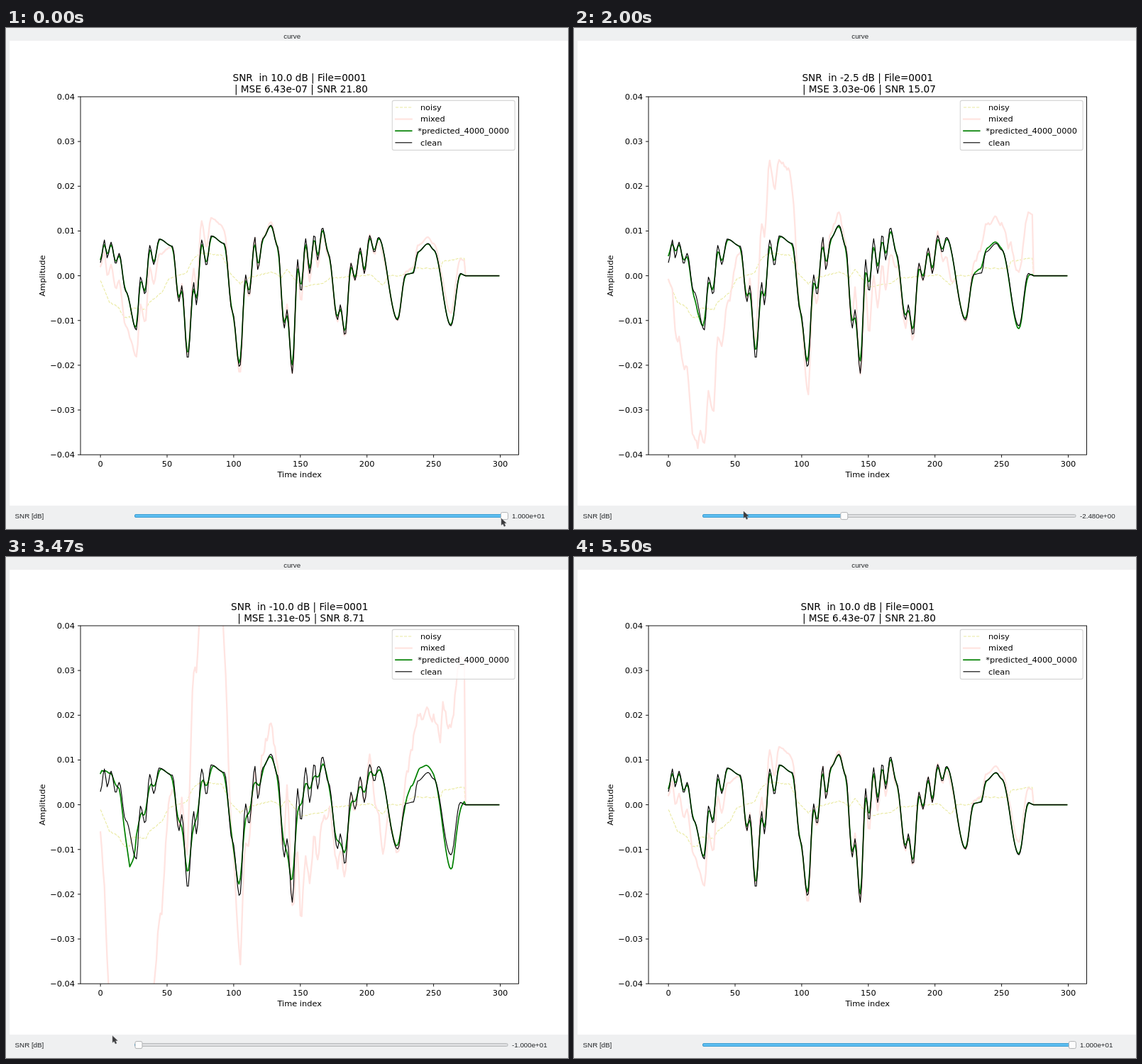
An HTML page that plays this animation: 792x707 px, repeating every 5730 ms.

```html
<!DOCTYPE html>
<html lang="en">
<head>
<meta charset="utf-8">
<title>curve</title>
<style>
html, body { margin: 0; width: 100%; height: 100%; overflow: hidden; background: #eff0f1; }
svg { display: block; }
text { white-space: pre; }
.plot text { font: 11.35px "DejaVu Sans", sans-serif; }
.plot .title { font-size: 13.62px; }
.ui text { font: 9.75px "Liberation Sans", Arial, sans-serif; fill: #232629; }
.mid { text-anchor: middle; }
.end { text-anchor: end; }
.axis { fill: none; stroke: #000; stroke-width: .91; }
.line { fill: none; stroke-linejoin: round; }
.noisy { stroke: #eaeaa2; stroke-width: 1.1; stroke-dasharray: 4.2 1.8; }
.mixed { stroke: #ffe4e1; stroke-width: 2.3; stroke-linecap: square; }
.pred { stroke: #008000; stroke-width: 1.7; stroke-linecap: square; }
.clean { stroke: #000; stroke-width: 1.13; stroke-linecap: square; }
</style>
</head>
<body>
<svg width="792" height="707" viewBox="0 0 792 707">
  <clipPath id="area"><rect x="105" y="97" width="617.5" height="505.2"/></clipPath>
  <rect x="5" y="18" width="787" height="656" fill="#fff"/>
  <g class="plot">
    <g clip-path="url(#area)">
      <path id="noisy" class="line noisy"/>
      <path id="mixed" class="line mixed"/>
      <path id="pred" class="line pred"/>
      <path id="clean" class="line clean"/>
    </g>
    <rect class="axis" x="105" y="97" width="617.5" height="505.2"/>
    <g id="ticks"></g>
    <text class="mid" x="413.7" y="634">Time index</text>
    <text class="mid" transform="translate(55 349.6) rotate(-90)">Amplitude</text>
    <text id="title" class="title mid" x="413.7" y="75"></text>
    <text id="score" class="title mid" x="413.7" y="91"></text>
    <rect x="544.3" y="102.4" width="172.8" height="70" rx="2.3" fill="#fff" fill-opacity=".8" stroke="#ccc" stroke-opacity=".8" stroke-width="1.13"/>
    <g id="legend"></g>
  </g>
  <g class="ui">
    <text class="mid" x="403.2" y="15.4">curve</text>
    <text x="12.6" y="691.8">SNR [dB]</text>
    <rect x="181.5" y="686.5" width="525.5" height="4" rx="1.5" fill="#dddee0" stroke="#b6b8ba"/>
    <rect id="fill" x="181.5" y="686.5" height="4" rx="1.5" fill="#5cbdf0" stroke="#3f9fd3"/>
    <rect id="knob" y="683.6" width="10" height="10" rx="2" fill="#fcfcfc" stroke="#b0b2b4"/>
    <text id="value" x="713" y="691.8"></text>
  </g>
  <path id="cursor" d="M0 0V9.6L2.3 7.8L4 11.4L5.9 10.5L4.3 7.1L7.2 6.8Z" fill="#3a3a3c" stroke="#77787a" stroke-width=".5"/>
</svg>
<script>
const $ = id => document.getElementById(id);
const LOOP = 5730, LAST = 274;

// Interpolates through a flat list x0, y0, x1, y1, ...
const straight = u => u, smooth = u => (1 - Math.cos(Math.PI * u)) / 2;
function along(keys, x, ease = straight) {
  let i = 2;
  while (i < keys.length - 2 && keys[i] < x) i += 2;
  const [x0, y0, x1, y1] = keys.slice(i - 2, i + 2);
  return y0 + (y1 - y0) * ease((x - x0) / (x1 - x0));
}

// Crests and troughs of the signals, amplitudes in units of 1e-4
const cleanKeys = [0, 30, 3, 80, 5, 40, 8, 75, 11.5, 26, 14, 50, 19, -35, 27, -121, 30, -3,
  33.5, -42, 37, 68, 40, 25, 44, 82, 54, 66, 59, -58, 61, -22, 65.5, -187, 70, -15, 72, -65,
  76, 80, 79.5, 22, 83, 89, 93, 72, 99, -80, 104.5, -205, 109, 2, 111.5, -44, 116, 86, 118, 14,
  122, 84, 128, 113, 133, 65, 138, -117, 140, -76, 144, -218, 148, 36, 150.5, -38, 154, 83,
  157, 5, 160.5, 93, 163, 35, 166.5, 108, 171, 50, 178, -98, 180, -65, 183.5, -134, 188, 28,
  191, -10, 195, 62, 198, 5, 202, 90, 205.5, 52, 208.5, 86, 223, -99, 229, 3, 235, 6, 238, 53,
  246, 72, 250, 58, 263, -112, 270, 5, 274, 0];
const noiseKeys = [0, -11, 7, -60, 13, -69, 18, -93, 22, -93, 24, -71, 34, -76, 37, -58, 46, -38,
  51, -8, 65, 8, 69, 36, 75, 50, 91, 46, 97, 7, 105, -18, 112, -4, 128, 9, 136, -3, 140, 14,
  150, -26, 167, -16, 172, -6, 203, 2, 212, -21, 216, 0, 226, 0, 235, 17, 255, 16, 257, 32, 273, 40];
// Where the prediction fails as the noise grows
const leakKeys = [0, 22, 14, 0, 22, -72, 27, 25, 32, 0, 228, 0, 233, 35, 250, 10, 264, -42, 272, 0];

const index = [...Array(300).keys()];
const sample = f => index.map(i => i < LAST ? f(i) : 0);
const clean = sample(i => along(cleanKeys, i, smooth));
const noise = sample(i => along(noiseKeys, i) + 1.2 * Math.sin(i * i));
const leak = sample(i => along(leakKeys, i));

function blur(radius) {
  return sample(i => {
    const near = clean.slice(Math.max(0, i - radius), i + radius + 1);
    return near.reduce((a, b) => a + b) / near.length;
  });
}
const sharp = blur(1), soft = blur(2);

const px = i => 133.1 + i * 1.878;
const py = a => 349.6 - a * .6315;
const trace = (id, f) => $(id).setAttribute('d',
  'M' + index.map(i => px(i).toFixed(1) + ' ' + py(f(i)).toFixed(1)).join('L'));

// Bursts of updates: first tick, last tick, count, at 30 ticks per second
const bursts = [[0, 0, 1], [8, 12, 5], [20, 28, 9], [44, 52, 3], [56, 67, 4], [71, 80, 4],
  [82, 82, 1], [102, 106, 3], [112, 118, 2], [125, 132, 2], [137, 137, 1], [152, 165, 5]];
const steps = bursts.flatMap(([first, last, n]) => Array.from({ length: n }, (_, i) =>
  Math.round((first + Math.round(i * (last - first) / Math.max(1, n - 1))) * 10 / 3) * 10));

const snrKeys = [0, 10, 800, 10, 830, 9.96, 930, 9.96, 1470, 4.62, 2000, -2.48, 2570, -9.78,
  2670, -10, 3530, -10, 3730, -9.12, 3930, -5.32, 4170, -1.06, 4400, 7.34, 4570, 10, LOOP, 10];
const cursorX = [0, 698, 330, 702, 670, 694, 930, 560, 1470, 457, 2000, 239, 2570, 146,
  2730, 122, 3400, 128, 3530, 169, 3730, 260, 3930, 428, 4170, 640, 4400, 850, 5069, 850,
  5070, 212, 5500, -20, LOOP, -20];
const cursorY = [0, 692, 930, 688, 1470, 688, 2000, 682, 2570, 670, 3530, 676, 3930, 682,
  5069, 682, 5070, 157, 5500, -45, LOOP, -45];
const scoreKeys = [-10, 8.71, -9.78, 8.91, -5.32, 12.9, -2.48, 15.07, 4.62, 19.83,
  7.34, 21.017, 10, 21.8];

const sci = (v, digits) => v.toExponential(digits).replace(/([+-])(\d)$/, (m, sign, d) => sign + '0' + d);
const gain = snr => .83 * 10 ** ((10 - snr) / 20);

function setSnr(snr) {
  const k = gain(snr);
  const w = Math.max(0, (k - gain(10)) / (gain(-9.78) - gain(10))) ** 1.3;
  trace('mixed', i => clean[i] + k * noise[i]);
  trace('pred', i => sharp[i] + w * (soft[i] - sharp[i] + leak[i]));
  const out = along(scoreKeys, snr), mse = 10 ** ((-40.115 - out) / 10);
  $('title').textContent = `SNR  in ${snr.toFixed(1)} dB | File=0001`;
  $('score').textContent = ` | MSE ${sci(mse, 2)} | SNR ${out.toFixed(2)}`;
  const x = 187 + (snr + 10) * 25.77;
  $('fill').setAttribute('width', x - 181.5);
  $('knob').setAttribute('x', x - 5);
  $('value').textContent = sci(snr, 3);
}

function buildStatic() {
  let ticks = '', legend = '';
  for (let v = -4; v <= 4; v++) {
    const y = py(v * 100), label = (v < 0 ? '\u2212' : '') + (Math.abs(v) / 100).toFixed(2);
    ticks += `<path class="axis" d="M101 ${y}H105"/><text class="end" x="97" y="${Math.round(y + 4)}">${label}</text>`;
  }
  for (let v = 0; v <= 300; v += 50)
    ticks += `<path class="axis" d="M${px(v)} 602.2v4"/><text class="mid" x="${px(v)}" y="619">${v}</text>`;
  [['noisy', ' noisy'], ['mixed', ' mixed'], ['pred', '*predicted_4000_0000'], ['clean', ' clean']]
    .forEach(([name, label], i) => {
      const y = 112 + i * 16.6;
      legend += `<path class="line ${name}" d="M549 ${y}H571.7"/><text x="580.3" y="${Math.round(y + 3.8)}">${label}</text>`;
    });
  $('ticks').innerHTML = ticks;
  $('legend').innerHTML = legend;
  trace('noisy', i => noise[i]);
  trace('clean', i => clean[i]);
}

let shownStep = -1, shownSnr;
function draw(now) {
  const t = now % LOOP;
  const step = steps.findLast(s => s <= t);
  if (step === shownStep) return;
  shownStep = step;
  const snr = Math.round(along(snrKeys, step) * 50) / 50;
  if (snr !== shownSnr) setSnr(shownSnr = snr);
  $('cursor').setAttribute('transform', `translate(${along(cursorX, step)} ${along(cursorY, step)})`);
}

buildStatic();
draw(0);
const start = performance.now();
requestAnimationFrame(function tick() {
  draw(performance.now() - start);
  requestAnimationFrame(tick);
});
</script>
</body>
</html>
```
